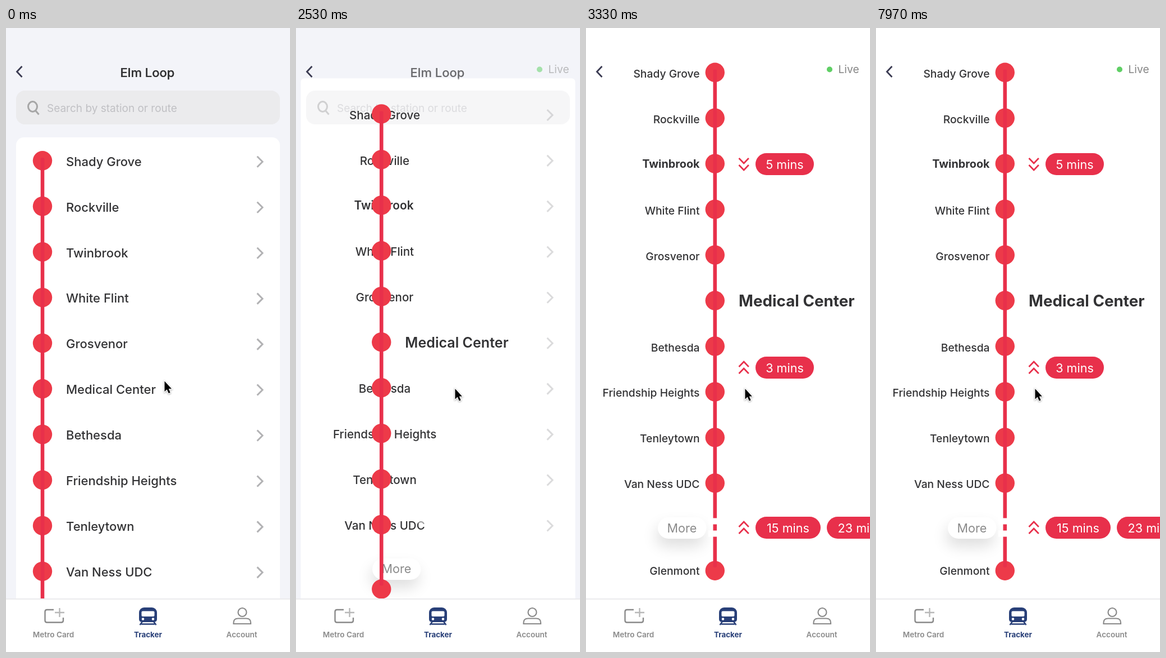
These frames come from a looping animation (506x1107 px, 8 s). An HTML page with a canvas:

```html
<!DOCTYPE html>
<html lang="en">
<head>
<meta charset="utf-8">
<title>Station tracker</title>
<style>
  html, body { margin: 0; width: 100%; height: 100%; overflow: hidden; background: #f3f4f9; }
  canvas { display: block; width: 506px; height: 1107px; }
</style>
</head>
<body>
<canvas id="stage"></canvas>
<script>
const W = 506, H = 1107, LOOP = 8000;
const RED = '#e8304b', DOT = '#ed3a49', INK = '#333335', GREY = '#8a8a8a', NAVY = '#283f78';
const STATIONS = ['Shady Grove', 'Rockville', 'Twinbrook', 'White Flint', 'Grosvenor',
  'Medical Center', 'Bethesda', 'Friendship Heights', 'Tenleytown', 'Van Ness UDC'];
const SELECTED = 5, NEXT_TRAIN = 2, PITCH = 80.95;

const canvas = document.getElementById('stage');
const ctx = canvas.getContext('2d');
const ratio = window.devicePixelRatio || 1;
canvas.width = W * ratio;
canvas.height = H * ratio;

const lerp = (a, b, p) => a + (b - a) * p;
const clamp = v => Math.min(1, Math.max(0, v));

// cubic-bezier(.25, .1, .25, 1), solved for x by bisection
function ease(x) {
  if (x <= 0 || x >= 1) return clamp(x);
  const curve = (a, b, s) => 3 * a * s * (1 - s) ** 2 + 3 * b * s * s * (1 - s) + s ** 3;
  let lo = 0, hi = 1;
  for (let i = 0; i < 24; i++) {
    const mid = (lo + hi) / 2;
    if (curve(.25, .25, mid) < x) lo = mid; else hi = mid;
  }
  return curve(.1, 1, lo);
}

const font = (size, weight) => `${Math.round(weight)} ${size}px Inter, sans-serif`;

function textWidth(str, size, weight) {
  ctx.font = font(size, weight);
  return ctx.measureText(str).width;
}

function text(str, x, y, size, weight, color, align = 'left') {
  ctx.font = font(size, weight);
  ctx.fillStyle = color;
  ctx.textAlign = align;
  ctx.fillText(str, x, y);
}

function box(x, y, w, h, r, color) {
  ctx.fillStyle = color;
  ctx.beginPath();
  ctx.roundRect(x, y, w, h, r);
  ctx.fill();
}

function disc(x, y, r, color) {
  ctx.fillStyle = color;
  ctx.beginPath();
  ctx.arc(x, y, r, 0, 7);
  ctx.fill();
}

function stroke(path, color, width) {
  ctx.strokeStyle = color;
  ctx.lineWidth = width;
  ctx.stroke(new Path2D(path));
}

function withAlpha(alpha, draw) {
  if (alpha <= 0) return;
  ctx.save();
  ctx.globalAlpha = alpha;
  draw();
  ctx.restore();
}

function drawListHeader() {
  text('Elm Loop', 252, 86.5, 22, 500, INK, 'center');
  box(18, 111, 470, 60, 16, '#ebebed');
  stroke('M55.5 139.5a8 9 0 1 1 -16 0a8 9 0 1 1 16 0M53 147l5.5 6.5', '#a6a6a6', 3);
  text('Search by station or route', 73, 148.5, 19, 400, '#c0c0c4');
}

function drawLabel(name, i, dotY, p) {
  const selected = i === SELECTED, strong = selected || i === NEXT_TRAIN;
  const endSize = selected ? 27.8 : strong ? 19.8 : 19.3;
  const endWeight = strong ? 700 : 500;
  const endX = selected ? 272 : 202.5 - textWidth(name, endSize, endWeight);
  const drop = lerp(9.3, selected ? 10.4 : strong ? 7 : 9, p);
  text(name, lerp(107, endX, p), dotY + drop, lerp(22, endSize, p), lerp(500, endWeight, p), INK);
}

function drawMore(p) {
  const x = lerp(145, 128, p), y = lerp(1023, 868, p);
  ctx.save();
  ctx.shadowColor = 'rgba(0,0,0,.13)';
  ctx.shadowBlur = 26 * ratio;
  ctx.shadowOffsetX = -3 * ratio;
  ctx.shadowOffsetY = 14 * ratio;
  box(x, y, 86.5, 38, 19, '#fff');
  ctx.restore();
  text('More', x + 43, y + 26.5, 21.6, 400, GREY, 'center');
}

function drawRoute(p) {
  const x = lerp(65, 229.8, p), top = lerp(235.3, 78.8, p);
  const lastY = lerp(1032, 962.7, p);
  STATIONS.forEach((name, i) => {
    const y = top + i * PITCH;
    drawLabel(name, i, y, p);
    withAlpha(1 - p, () => stroke(`M447.5 ${y - 7.5}l9.5 9.5l-9.5 9.5`, '#b2b2b4', 3));
  });
  const lastX = 202.5 - textWidth('Glenmont', 19.3, 500);
  text('Glenmont', lerp(125, lastX, p), lerp(1126, 970.3, p), lerp(22, 19.3, p), 500, INK);
  if (p > 0) drawMore(p);
  STATIONS.forEach((_, i) => disc(x, top + i * PITCH, 17.2, DOT));
  disc(x, lastY, 17.2, DOT);
  box(x - 3.3, top - 5, 6.6, lastY - top - 1, 2, RED);
  withAlpha(p, () => {
    box(218, 869.5, 16, 11, 0, '#fff');
    box(218, 891.5, 16, 11, 0, '#fff');
  });
}

function drawArrivals(p) {
  const shift = 50 * (1 - p);
  const pill = (label, x, y, w) => {
    box(x, y, w, 39, 19.5, RED);
    text(label, x + w / 2, y + 27.5, 21.6, 400, '#fff', 'center');
  };
  // dir: 1 points down, -1 points up
  const arrows = (y, dir) => {
    for (const dy of [-6, 6])
      stroke(`M272.5 ${y + dy - 4.5 * dir}l8.7 ${9 * dir}l8.7 ${-9 * dir}`, RED, 2.7);
  };
  withAlpha(p, () => {
    ctx.translate(shift * ratio / ratio, 0);
    arrows(241.5, 1);
    pill('5 mins', 302, 222, 104);
    arrows(602.5, -1);
    pill('3 mins', 302, 583, 104);
    arrows(886.5, -1);
    pill('15 mins', 302, 867, 116);
    pill('23 mins', 429, 867, 120);
  });
}

function drawTabs() {
  box(0, 1012, W, 95, 0, '#fff');
  box(0, 1012, W, 2, 0, '#ebebed');

  stroke('M85 1032H73q-3.5 0 -3.5 3.5V1051q0 3.5 3.5 3.5H98.500q3.500 0 3.500 -3.500V1046', GREY, 2.4);
  stroke('M95.500 1029v16M87 1037h17', '#b8b8b8', 2.4);
  text('Metro Card', 84.5, 1081, 13.6, 600, GREY, 'center');

  box(237, 1028, 32, 26, [9, 9, 5, 5], NAVY);
  box(241.5, 1034.5, 23, 9.5, 2, '#fff');
  disc(244, 1048.5, 2.2, '#fff');
  disc(262, 1048.5, 2.2, '#fff');
  stroke('M243 1053l-4.500 6M263 1053l4.500 6M241 1057.500h24', NAVY, 2.4);
  text('Tracker', 253, 1081, 13.4, 700, NAVY, 'center');

  stroke('M428.500 1036.500a7.500 7.500 0 1 1 -15 0a7.500 7.500 0 1 1 15 0', GREY, 2.2);
  stroke('M405.500 1057v-2q0 -7.500 8 -7.500h14.500q8 0 8 7.500v2z', GREY, 2.2);
  text('Account', 420, 1081, 13.5, 600, GREY, 'center');
}

function drawCursor(x, y) {
  const arrow = new Path2D('M0 0V18.5L4.200 14.600L7.200 21.500L10.200 20.200L7.300 13.400H12.500Z');
  ctx.save();
  ctx.translate(x, y);
  ctx.shadowColor = 'rgba(0,0,0,.35)';
  ctx.shadowBlur = 3 * ratio;
  ctx.shadowOffsetY = ratio;
  ctx.strokeStyle = '#fff';
  ctx.lineWidth = 2.4;
  ctx.stroke(arrow);
  ctx.shadowColor = 'transparent';
  ctx.fillStyle = '#000';
  ctx.fill(arrow);
  ctx.restore();
}

function draw(t) {
  const open = ease((t - 2400) / 425);
  const arrivals = ease((t - 2882) / 425);
  const glide = 1 - (1 - clamp(t / 230)) ** 2;

  ctx.setTransform(ratio, 0, 0, ratio, 0, 0);
  ctx.lineJoin = 'miter';
  box(0, 0, W, H, 0, '#f3f4f9');
  withAlpha(1 - open, drawListHeader);
  box(lerp(18, 0, open), lerp(194, -4, open), lerp(470, W, open), H, lerp(14, 0, open), '#fff');
  withAlpha(1 - open, drawListHeader);
  drawRoute(open);
  drawArrivals(arrivals);

  withAlpha(open, () => {
    disc(434, 73.5, 5, '#5fcf65');
    text('Live', 449.5, 80, 19.2, 400, '#858585');
  });
  stroke('M28.500 68l-9 9.500l9 9.500', '#3b3b52', 2.8);
  drawTabs();

  if (t >= 2230 && t < 2370) disc(282, 641, 31, 'rgba(120,120,120,.3)');
  drawCursor(lerp(282.5, 283.5, glide), lerp(626.5, 640, glide));
}

function tick() {
  draw(performance.now() % LOOP);
  requestAnimationFrame(tick);
}
tick();
</script>
</body>
</html>
```
